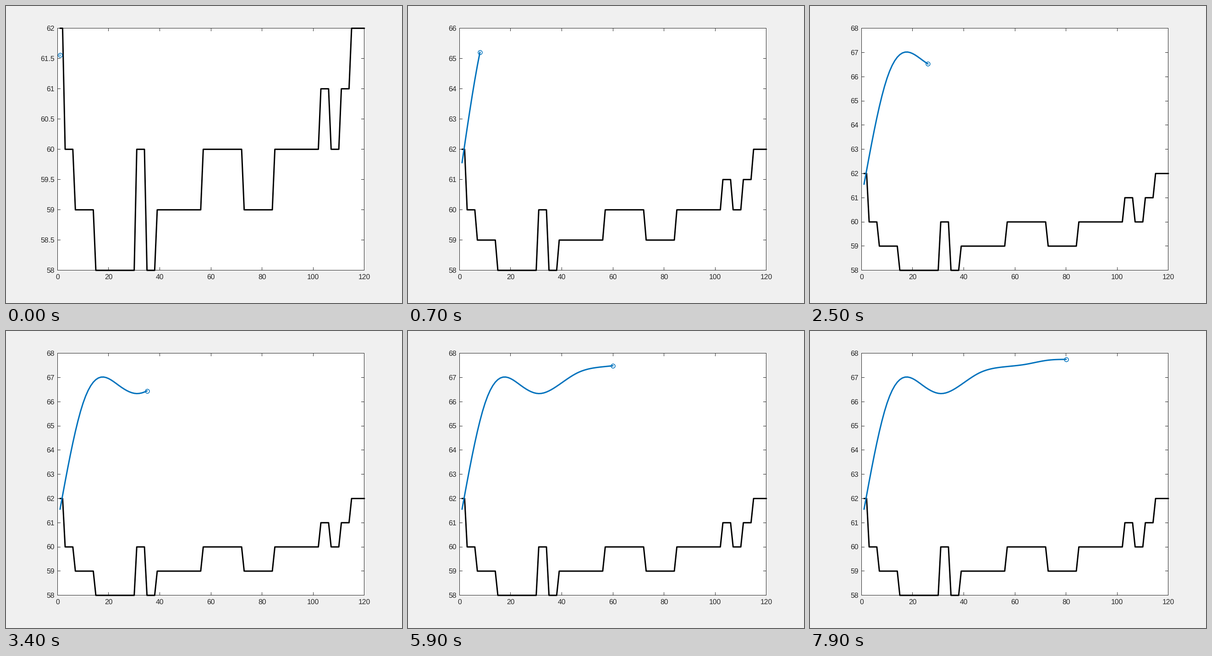
Write a matplotlib script that moves like this. It is 864 px wide and 648 px high and loops after 8000 ms.

```python
import math

import numpy as np
import matplotlib.pyplot as plt
from matplotlib.animation import FuncAnimation
from matplotlib.collections import LineCollection

W, H, DPI = 864, 648, 100
LEFT, RIGHT = 0.13 * W, 0.905 * W
TOP, BOTTOM = 0.075 * H, 0.89 * H
FRAMES, INTERVAL = 80, 100
X_MAX, Y_MIN = 120, 58
BLUE, INK = "#0072bd", "#262626"
PT = 72 / DPI  # points per pixel
TICK = 6.5

plt.rcParams["font.family"] = "Liberation Sans"
plt.rcParams["text.hinting"] = "none"

# Stepped line: (samples, level) for each run
RUNS = [(2, 62), (4, 60), (8, 59), (16, 58), (4, 60), (4, 58), (18, 59),
        (16, 60), (12, 59), (18, 60), (4, 61), (4, 60), (4, 61), (6, 62)]
# Key points of the smooth curve
KEYS = [(1, 61.555), (5, 63.79), (10, 65.94), (17.4, 67.02), (24, 66.67),
        (31, 66.335), (38, 66.635), (46, 67.185), (55, 67.43), (64, 67.54),
        (73, 67.715), (80, 67.748)]


def spline(keys, x):
    """Natural cubic spline through the keys, evaluated at x."""
    kx, ky = np.array(keys, float).T
    h, n = np.diff(kx), len(kx)
    slope = np.diff(ky) / h
    a, rhs = np.eye(n), np.zeros(n)
    for i in range(1, n - 1):
        a[i, i - 1:i + 2] = h[i - 1], 2 * (h[i - 1] + h[i]), h[i]
        rhs[i] = 6 * (slope[i] - slope[i - 1])
    m = np.linalg.solve(a, rhs)
    i = np.clip(np.searchsorted(kx, x) - 1, 0, n - 2)
    u, v = x - kx[i], kx[i + 1] - x
    return ((m[i] * v**3 + m[i + 1] * u**3) / (6 * h[i])
            + (ky[i] / h[i] - m[i] * h[i] / 6) * v
            + (ky[i + 1] / h[i] - m[i + 1] * h[i] / 6) * u)


def to_px(x, y, top):
    px = LEFT + np.asarray(x) / X_MAX * (RIGHT - LEFT)
    py = BOTTOM - (np.asarray(y) - Y_MIN) / (top - Y_MIN) * (BOTTOM - TOP)
    return px, py


def y_scale(peak):
    """Upper limit and tick step that hold the peak."""
    if peak <= 63:
        return max(62, math.ceil(peak * 2) / 2), 0.5
    return math.ceil(peak), 1


def pixel(v):
    """Centre of the pixel that holds v."""
    return math.floor(v) + 0.5


step_x = np.arange(1, X_MAX + 1)
step_y = np.concatenate([np.full(size, level) for size, level in RUNS])
curve_x = np.arange(1, FRAMES + 1)
curve_y = spline(KEYS, curve_x)

fig = plt.figure(figsize=(W / DPI, H / DPI), dpi=DPI, facecolor="#f0f0f0")
ax = fig.add_axes([0, 0, 1, 1])
ax.set_xlim(0, W)
ax.set_ylim(H, 0)
ax.axis("off")

x0, x1, y0, y1 = map(pixel, (LEFT, RIGHT, TOP, BOTTOM))
ax.fill([x0, x1, x1, x0], [y0, y0, y1, y1], facecolor="white",
        edgecolor=INK, lw=PT, snap=False, zorder=1)


def tick_lines(segments):
    lines = LineCollection(segments, colors=INK, lw=PT, snap=False, zorder=2)
    return ax.add_collection(lines, autolim=False)


label_style = dict(fontsize=15.7 * PT, color=INK, va="baseline")
x_ticks = []
for value in range(0, X_MAX + 1, 20):
    x = float(to_px(value, Y_MIN, 62)[0])
    ax.text(x, 596, str(value), ha="center", **label_style)
    x = pixel(x)
    x_ticks += [[(x, y0), (x, y0 + TICK)], [(x, y1), (x, y1 - TICK)]]
tick_lines(x_ticks)

y_ticks = tick_lines([])
y_labels = [ax.text(106, 0, "", ha="right", **label_style) for _ in range(11)]

thick = dict(lw=3 * PT, solid_capstyle="round", solid_joinstyle="round",
             snap=False)
steps, = ax.plot([], [], color="black", zorder=3, **thick)
curve, = ax.plot([], [], color=BLUE, zorder=4, **thick)
head, = ax.plot([], [], "o", ms=9 * PT, mfc="none", mec=BLUE,
                mew=1.5 * PT, zorder=5, snap=False)


def draw(frame):
    n = frame + 1
    top, step = y_scale(curve_y[:n].max())

    segments = []
    count = round((top - Y_MIN) / step) + 1
    for i, label in enumerate(y_labels):
        label.set_visible(i < count)
        if i < count:
            value = Y_MIN + i * step
            y = float(to_px(0, value, top)[1])
            label.set_text(f"{value:g}")
            label.set_y(y + 5.2)
            y = pixel(y)
            segments += [[(x0, y), (x0 + TICK, y)], [(x1, y), (x1 - TICK, y)]]
    y_ticks.set_segments(segments)

    steps.set_data(*to_px(step_x, step_y, top))
    px, py = to_px(curve_x[:n], curve_y[:n], top)
    head.set_data(px[-1:], py[-1:])
    # A tiny tail lets a lone point show as a dot
    curve.set_data(np.append(px, px[-1] + 0.05), np.append(py, py[-1]))
    return [steps, curve, head, y_ticks, *y_labels]


anim = FuncAnimation(fig, draw, frames=FRAMES, interval=INTERVAL,
                     repeat=True, repeat_delay=0, blit=False)
plt.show()
```
